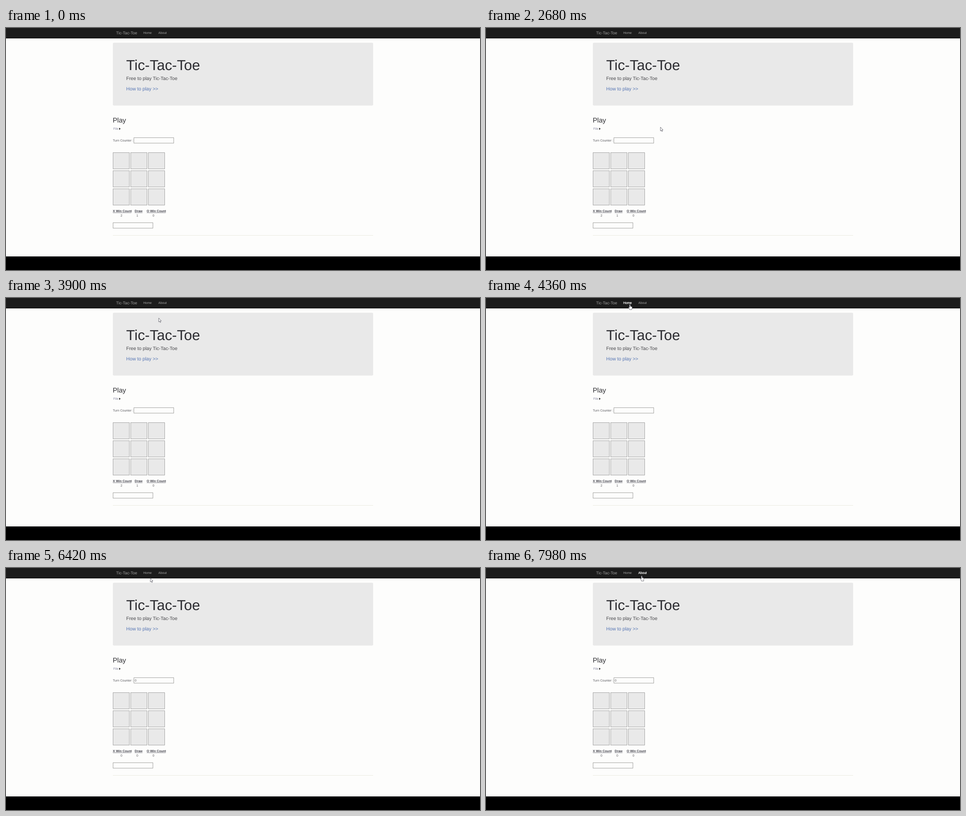
Recreate the animation shown at these times as an HTML page. Size 1047 by 535 pixels, loop 8 s.

```html
<!DOCTYPE html>
<html lang="en">
<head>
<meta charset="utf-8">
<title>Tic-Tac-Toe</title>
<style>
html, body { margin: 0; width: 100%; height: 100%; overflow: hidden; background: #fdfdfc; }
svg { display: block; width: 1047px; height: 535px; }
text { font-family: "Liberation Sans", Arial, sans-serif; font-size: 7.06px; fill: #5a5a5e; text-rendering: geometricPrecision; }
.nav text { fill: #a6a6a6; }
.nav .brand { font-size: 9.08px; fill: #9d9d9d; }
.nav .hover { fill: #fff; stroke: #fff; stroke-width: .25px; }
.title { font-size: 31.8px; fill: #2b2b30; }
.lead { font-size: 10.6px; fill: #48484c; }
.link { fill: #5575b4; }
.sub { font-size: 15.1px; fill: #303034; }
.file { fill: #8586a0; }
.head { font-weight: bold; fill: #3c3c46; }
.num { text-anchor: middle; }
.box { fill: #fdfdfc; stroke: #a2a2a0; }
.cell { fill: #e9e9e9; stroke: #a4a4a4; }
.cursor { fill: #fff; stroke: #55555f; stroke-width: .8px; stroke-linejoin: round; }
</style>
</head>
<body>
<svg viewBox="0 0 1047 535">
  <rect width="1047" height="535" fill="#fdfdfc"/>
  <g class="nav">
    <rect width="1047" height="23" fill="#1c1c1c"/>
    <rect y="22" width="1047" height="1" fill="#0a0a0a"/>
    <text class="brand" x="243.3" y="13.6">Tic-Tac-Toe</text>
    <text id="home" x="303.2" y="12.6">Home</text>
    <text id="about" x="336.6" y="12.6">About</text>
  </g>
  <rect x="236" y="32.5" width="575" height="139" rx="3" fill="#e9e9e9"/>
  <text class="title" x="265.6" y="93.3">Tic-Tac-Toe</text>
  <text class="lead" x="265.6" y="115.3">Free to play Tic-Tac-Toe</text>
  <text class="lead link" x="265.6" y="137.5">How to play &gt;&gt;</text>

  <text class="sub" x="235.8" y="209">Play</text>
  <text class="file" x="237" y="224.6">File</text>
  <path d="M250 220.4L253 222.8 250 225.2Z" fill="#111"/>
  <text x="236" y="250.6">Turn Counter :</text>
  <rect class="box" x="282.5" y="242.5" width="88" height="12"/>
  <text id="turn" x="284.3" y="250.6"></text>
  <g id="board"></g>

  <g id="score"></g>
  <rect class="box" x="236.5" y="430.5" width="88" height="12"/>
  <path d="M236 458.5H811" stroke="#ebebe0"/>
  <rect y="505" width="1047" height="30"/>

  <g id="cursor" class="cursor">
    <path id="arrow" d="M.4 .4V9L2.3 7.3 3.6 10.2 5 9.6 3.7 6.7H6.2Z"/>
    <path id="hand" d="M-1 1Q0 -.4 .9 1V4.6L3.8 5.2Q5.2 5.6 5 7L4.4 9.6V11.8H-.8V10.4L-3 7.2Q-3 5.8 -1.8 6.4L-1 7.2Z"/>
  </g>
</svg>
<script>
const LOOP = 8000, ENTER = 2380, RELOAD = 5900;
const $ = id => document.getElementById(id);

// Pointer path: time, x, y
const path = [
  [ENTER, 537, 449], [2500, 488, 376], [2680, 385, 219], [2960, 350, 118],
  [3240, 338, 58], [3900, 337, 44], [4080, 325, 26], [4200, 320, 18],
  [4440, 317, 12], [6080, 317, 12], [6560, 319, 26], [6700, 320, 28],
  [7260, 332, 43], [7540, 335, 42], [7760, 342, 22], [7960, 344, 17], [LOOP, 344, 17]
];
const onHome = t => t >= 4180 && t < 6240;
const onAbout = t => t >= 7760;

function add(parent, tag, attrs, text = "") {
  const el = document.createElementNS("http://www.w3.org/2000/svg", tag);
  for (const k in attrs) el.setAttribute(k, attrs[k]);
  el.textContent = text;
  parent.append(el);
  return el;
}

for (let i = 0; i < 9; i++) {
  add($("board"), "rect", {
    class: "cell", width: 36, height: 36,
    x: 236.5 + (i % 3) * 39, y: 275.5 + Math.floor(i / 3) * 40
  });
}

const scores = [
  ["X Win Count", 236, 41, 255, 2],
  ["Draw", 284.3, 17.2, 290, 1],
  ["O Win Count", 310.8, 42, 325.8, 0]
].map(([label, x, w, mid, count]) => {
  add($("score"), "text", { class: "head", x, y: 407 }, label);
  add($("score"), "path", { d: `M${x} 408.4h${w}`, stroke: "#55555f", "stroke-width": .7 });
  return { count, el: add($("score"), "text", { class: "num", x: mid, y: 416.6 }) };
});

function pointAt(t) {
  const i = Math.max(1, path.findIndex(p => p[0] > t));
  const [t0, x0, y0] = path[i - 1], [t1, x1, y1] = path[i];
  const k = (t - t0) / (t1 - t0);
  return [x0 + (x1 - x0) * k, y0 + (y1 - y0) * k];
}

const show = (el, on) => el.setAttribute("visibility", on ? "visible" : "hidden");

function draw(t) {
  const home = onHome(t), about = onAbout(t), seen = t >= ENTER, fresh = t >= RELOAD;
  $("home").classList.toggle("hover", home);
  $("about").classList.toggle("hover", about);
  $("turn").textContent = fresh ? "0" : "";
  for (const s of scores) s.el.textContent = fresh ? 0 : s.count;
  show($("arrow"), seen && !home && !about);
  show($("hand"), seen && (home || about));
  if (seen) $("cursor").setAttribute("transform", `translate(${pointAt(t)})`);
}

const start = performance.now();
function tick() {
  draw((performance.now() - start) % LOOP);
  requestAnimationFrame(tick);
}
tick();
</script>
</body>
</html>
```
